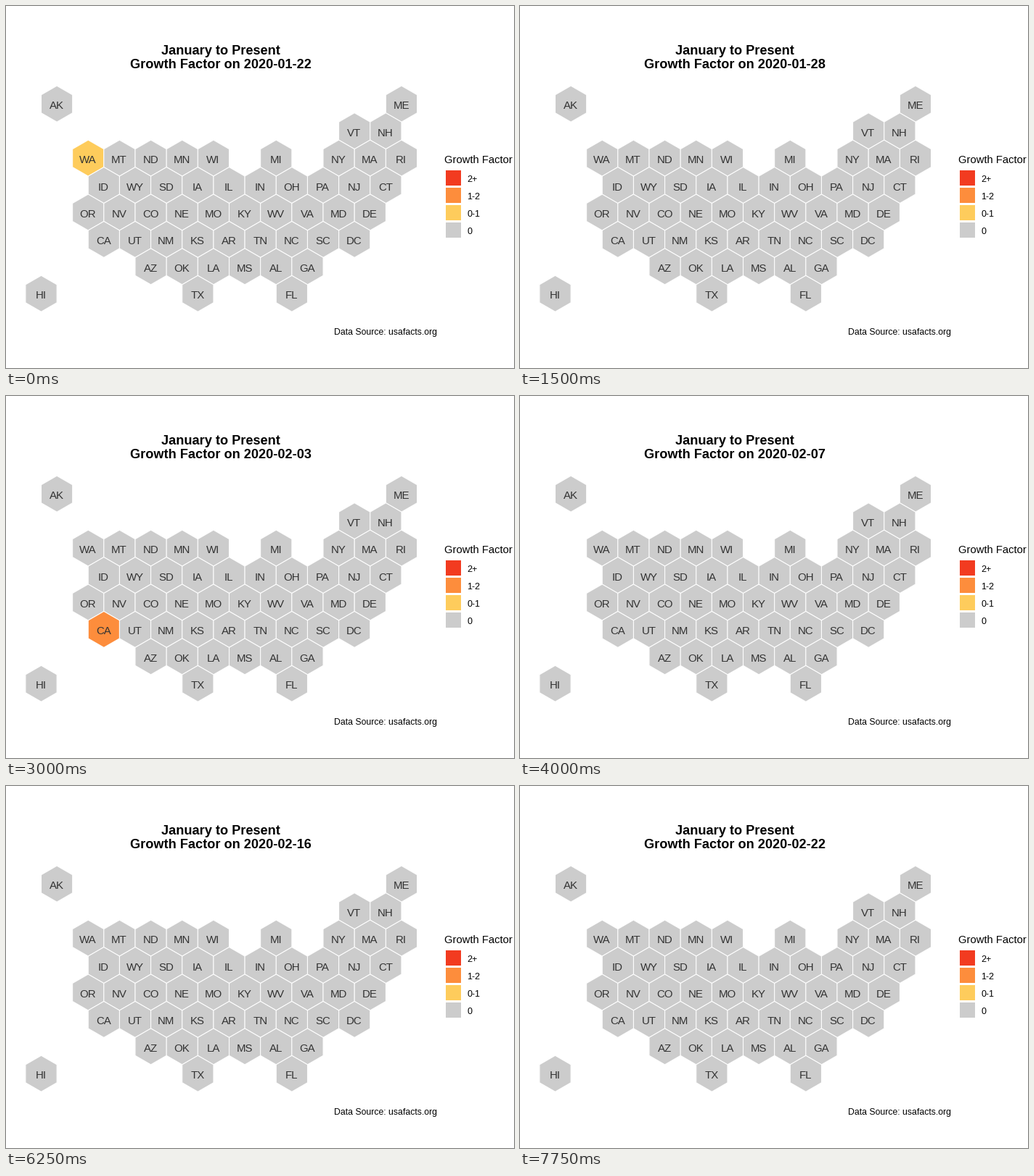
A matplotlib script that plays this animation: 700x500 px, repeating every 8 s.

```python
import math

import matplotlib.pyplot as plt
from matplotlib.animation import FuncAnimation
from matplotlib.patches import Polygon, Rectangle

W, H, DPI = 700, 500, 100
DAYS, STEP_MS = 32, 250

GREY, YELLOW, ORANGE, RED = "#cccccc", "#fecc5c", "#fd8d3c", "#f23b20"

# Each row: runs of neighbouring states, keyed by their first half-column.
ROWS = [
    {1: "AK", 23: "ME"},
    {20: "VT NH"},
    {3: "WA MT ND MN WI", 15: "MI", 19: "NY MA RI"},
    {4: "ID WY SD IA IL IN OH PA NJ CT"},
    {3: "OR NV CO NE MO KY WV VA MD DE"},
    {4: "CA UT NM KS AR TN NC SC DC"},
    {7: "AZ OK LA MS AL GA"},
    {0: "HI", 10: "TX", 16: "FL"},
]
X0, HALF_COL = 48.5, 21.585
Y0, ROW_STEP = 135.2, 37.44
RADIUS = 24.95

# Day offset from 22 January -> coloured states
GROWTH = {
    0: {"WA": YELLOW},
    2: {"IL": YELLOW},
    4: {"CA": ORANGE, "AZ": YELLOW},
    9: {"IL": YELLOW},
    10: {"CA": YELLOW, "MA": YELLOW},
    11: {"CA": YELLOW},
    12: {"CA": ORANGE},
    14: {"WI": YELLOW},
    20: {"CA": YELLOW},
    22: {"CA": YELLOW},
    30: {"CA": ORANGE},
}

plt.rcParams["font.family"] = "Liberation Sans"
fig = plt.figure(figsize=(W / DPI, H / DPI), dpi=DPI, facecolor="white")
ax = fig.add_axes([0, 0, 1, 1])
ax.set_xlim(0, W)
ax.set_ylim(H, 0)
ax.axis("off")


def write(x, y, text, px, ha="left", color="black", weight="normal"):
    return ax.text(x, y, text, size=px * 72 / DPI, ha=ha, va="baseline",
                   color=color, weight=weight, zorder=3)


def add_state(name, x, y):
    angles = [math.radians(60 * k + 30) for k in range(6)]
    points = [(x + RADIUS * math.cos(a), y + RADIUS * math.sin(a))
              for a in angles]
    write(x - 0.4, round(y + 7.05), name, 15, "center", "#333333")
    return ax.add_patch(Polygon(points, facecolor=GREY, edgecolor="white",
                                linewidth=0.75))


def add_map():
    hexes = {}
    for row, runs in enumerate(ROWS):
        for start, names in runs.items():
            for i, name in enumerate(names.split()):
                x = X0 + HALF_COL * (start + 2 * i)
                hexes[name] = add_state(name, x, Y0 + ROW_STEP * row)
    return hexes


def add_legend():
    write(603.5, 217, "Growth Factor", 14.8)
    keys = [("2+", RED), ("1-2", ORANGE), ("0-1", YELLOW), ("0", GREY)]
    for i, (label, color) in enumerate(keys):
        y = 227 + 24 * i
        ax.add_patch(Rectangle((606, y), 21, 21, facecolor=color, linewidth=0))
        write(635, y + 16, label, 12.5)


def date_text(day):
    month, date = (1, 22 + day) if day < 10 else (2, day - 9)
    return f"Growth Factor on 2020-{month:02d}-{date:02d}"


hexes = add_map()
add_legend()
write(296, 67, "January to Present", 18.2, "center", weight="bold")
title = write(296, 86, date_text(0), 18.1, "center", weight="bold")
write(593.5, 454, "Data Source: usafacts.org", 12.3, "right")


def draw(day):
    title.set_text(date_text(day))
    colors = GROWTH.get(day, {})
    for name, patch in hexes.items():
        patch.set_facecolor(colors.get(name, GREY))
    return [title, *hexes.values()]


anim = FuncAnimation(fig, draw, frames=DAYS, interval=STEP_MS,
                     repeat=True, repeat_delay=0, blit=False)
plt.show()
```
